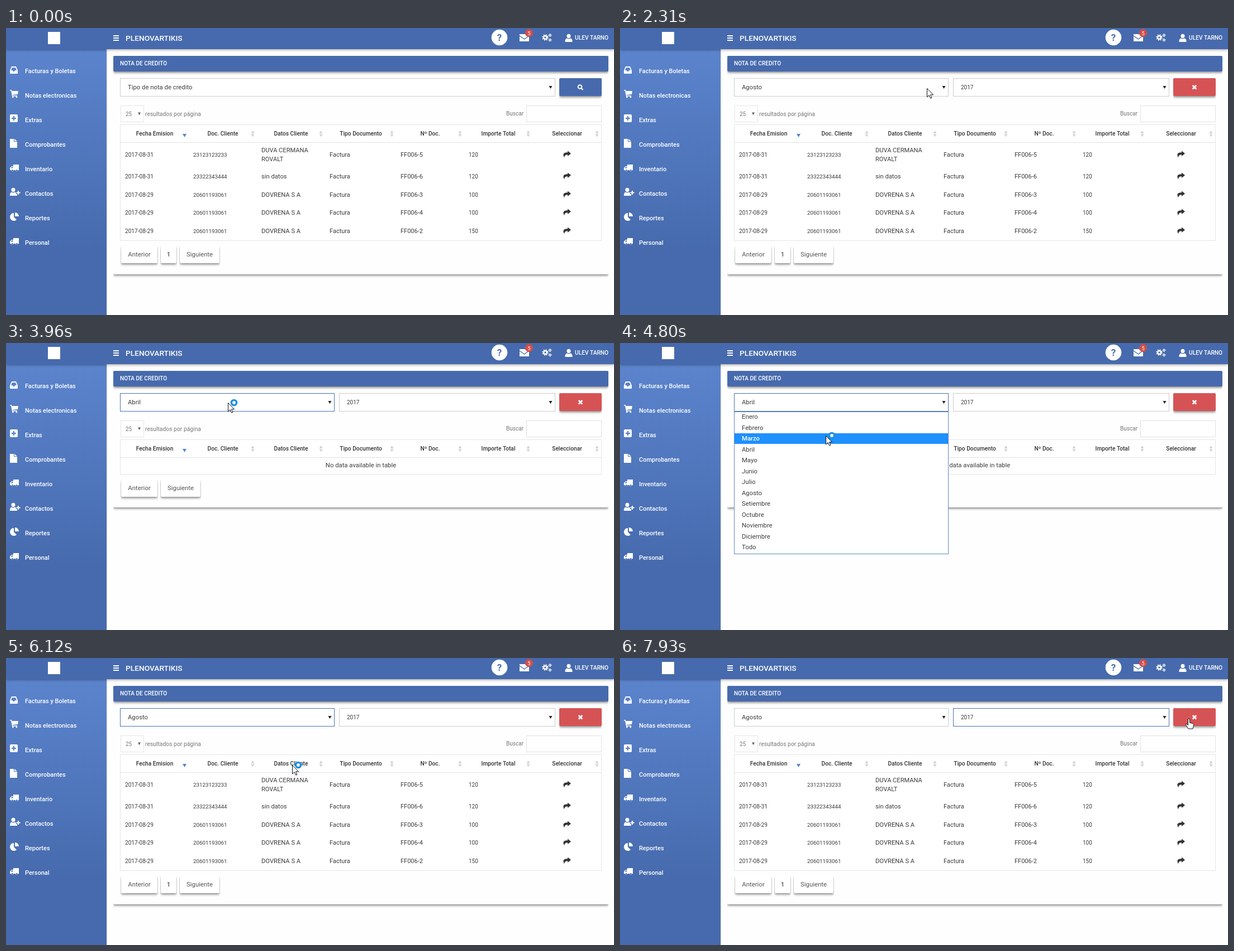
Recreate the animation shown at these times as an HTML page with a canvas. Size 1088 by 515 pixels, loop 8 s.

```html
<!DOCTYPE html>
<html lang="es">
<head>
<meta charset="utf-8">
<title>Nota de credito</title>
<style>
html, body { margin: 0; width: 100%; height: 100%; overflow: hidden; background: #fefefe; }
canvas { display: block; width: 1088px; height: 515px; }
</style>
</head>
<body>
<canvas id="stage" width="1088" height="515"></canvas>
<script>
const ctx = document.getElementById('stage').getContext('2d');
const LOOP = 8000;
const BLUE = '#466aad', RED = '#d65355', INK = '#3c3c3c', FOCUS = '#4a73b8';
const MONTHS = ['Enero', 'Febrero', 'Marzo', 'Abril', 'Mayo', 'Junio', 'Julio', 'Agosto',
  'Setiembre', 'Octubre', 'Noviembre', 'Diciembre', 'Todo'];
const YEARS = ['2016', '2017'];
const ITEM_H = 19.5, LIST_Y = 123.5;

const ICONS = {
  inbox: 'M3 0h8l3 7v5q0 1-1 1H1q-1 0-1-1V7zM4 2L2 7h3l1 2h2l1-2h3L10 2z',
  cart: 'M0 0h3l.5 2H15l-1 6-9 1 .3 1H13v1.5H4L2 1.5H0zM4 13a1.4 1.4 0 1 0 2.8 0a1.4 1.4 0 1 0-2.8 0M10.5 13a1.4 1.4 0 1 0 2.8 0a1.4 1.4 0 1 0-2.8 0',
  plus: 'M2 0h10q2 0 2 2v10q0 2-2 2H2q-2 0-2-2V2q0-2 2-2zM6 3v3H3v2h3v3h2V8h3V6H8V3z',
  file: 'M0 0h7v5h6v11H0zM8 0l5 4H8z',
  truck: 'M6 0h10v10h-1.5a2.3 2.3 0 0 1-4.6 0H6.6a2.3 2.3 0 0 1-4.6 0H0V6l3-3h3zM4 4L1.5 6.5H5V4zM2.7 10.5a1.6 1.6 0 1 0 3.2 0a1.6 1.6 0 1 0-3.2 0M10.6 10.5a1.6 1.6 0 1 0 3.2 0a1.6 1.6 0 1 0-3.2 0',
  user: 'M3 3.5a3.5 3.7 0 1 0 7 0a3.5 3.7 0 1 0-7 0M0 14q-.3-6 3.5-6.5q3 1.8 6 0q3.8.5 3.5 6.5z',
  addUser: 'M2.5 3.5a3.5 3.7 0 1 0 7 0a3.5 3.7 0 1 0-7 0M0 14q-.3-6 3.3-6.5q2.7 1.8 5.4 0q1.6.2 2.3 1.5v2h2v3zM14 5h2v2.5h2.5v2H16V12h-2V9.5h-2.5v-2H14z',
  pie: 'M7 1v7l5 5a7 7 0 1 1-5-12zM9 0a7 7 0 0 1 7 7H9z',
  share: 'M8.5 0l6 4.7-6 4.7V6.7Q3 6.5 2.5 12Q-2.5 2.8 8.5 2.8z',
  arrow: 'M0 0v15.5l3.6-3.4 2.5 5.6 2.4-1-2.5-5.4h5z',
  hand: 'M-1.5 1q1.5-2 3 0v6l6 1.5q1.5.5 1 3l-1.5 6.5h-8l-4.5-7q0-2 2-1.5l2 2z'
};
for (const name in ICONS) ICONS[name] = new Path2D(ICONS[name]);

function text(s, x, y, size, color = INK, weight = 400, align = 'left') {
  ctx.font = `${weight} ${size}px Roboto, sans-serif`;
  ctx.textAlign = align;
  ctx.fillStyle = color;
  ctx.fillText(s, x, y + 4);
}

function rect(x, y, w, h, color) {
  ctx.fillStyle = color;
  ctx.fillRect(x, y, w, h);
}

function box(x, y, w, h, border, fill = '#fff') {
  rect(x, y, w, h, fill);
  ctx.strokeStyle = border;
  ctx.lineWidth = 1;
  ctx.strokeRect(x + .5, y + .5, w - 1, h - 1);
}

// The shadow falls below only; `side` lets a little of it out left and right
function raised(x, y, w, h, fill, side = 0) {
  ctx.save();
  ctx.beginPath();
  ctx.rect(x - side, y, w + side * 2, h + 8);
  ctx.clip();
  ctx.shadowColor = 'rgba(0,0,0,.5)';
  ctx.shadowBlur = 4;
  ctx.shadowOffsetY = 2;
  ctx.fillStyle = fill;
  ctx.beginPath();
  ctx.roundRect(x, y, w, h, 2);
  ctx.fill();
  ctx.restore();
}

function disc(x, y, r, color) {
  ctx.fillStyle = color;
  ctx.beginPath();
  ctx.arc(x, y, r, 0, 7);
  ctx.fill();
}

function line(points, color, width) {
  ctx.strokeStyle = color;
  ctx.lineWidth = width;
  ctx.beginPath();
  points.forEach(p => ctx.lineTo(...p));
  ctx.stroke();
}

function tri(x, y, w, h, color) {
  ctx.fillStyle = color;
  ctx.beginPath();
  ctx.moveTo(x - w / 2, y);
  ctx.lineTo(x + w / 2, y);
  ctx.lineTo(x, y + h);
  ctx.fill();
}

function icon(name, x, y, fill = '#fff', outline) {
  ctx.save();
  ctx.translate(x, y);
  ctx.fillStyle = fill;
  ctx.fill(ICONS[name], 'evenodd');
  if (outline) {
    ctx.strokeStyle = outline;
    ctx.lineWidth = 1;
    ctx.stroke(ICONS[name]);
  }
  ctx.restore();
}

function cog(x, y, r) {
  ctx.save();
  ctx.strokeStyle = '#fff';
  ctx.lineWidth = r * .5;
  ctx.beginPath();
  ctx.arc(x, y, r * .6, 0, Math.PI * 2);
  ctx.stroke();
  ctx.setLineDash([r * Math.PI / 8]);
  ctx.lineWidth = r * .4;
  ctx.beginPath();
  ctx.arc(x, y, r, 0, Math.PI * 2);
  ctx.stroke();
  ctx.restore();
}

function sidebar() {
  const g = ctx.createLinearGradient(0, 38, 0, 400);
  g.addColorStop(0, '#5b84cd');
  g.addColorStop(1, '#466aad');
  ctx.save();
  ctx.shadowColor = 'rgba(0,0,0,.25)';
  ctx.shadowBlur = 3;
  rect(0, 38, 180, 477, g);
  ctx.restore();
  const items = [['inbox', 'Facturas y Boletas'], ['cart', 'Notas electronicas'], ['plus', 'Extras'],
    ['file', 'Comprobantes'], ['truck', 'Inventario'], ['addUser', 'Contactos'],
    ['pie', 'Reportes'], ['truck', 'Personal']];
  items.forEach(([name, label], i) => {
    const y = Math.round(77 + i * 43.95);
    const low = name === 'inbox' || name === 'truck';
    icon(name, 7, y - (low ? 8 : 10));
    text(label, 34, y, 11, '#fff', 500);
  });
}

function topBar() {
  ctx.save();
  ctx.shadowColor = 'rgba(0,0,0,.4)';
  ctx.shadowBlur = 5;
  ctx.shadowOffsetY = 1;
  rect(0, 0, 1088, 38, BLUE);
  ctx.restore();
  rect(75, 7, 22, 22, '#fff');
  for (let i = 0; i < 3; i++) rect(192, 13 + i * 4, 10, 2, '#fff');
  text('PLENOVARTIKIS', 214, 19, 13.7, '#fff', 500);
  disc(883, 17, 14.3, '#fff');
  text('?', 883, 19, 17, BLUE, 700, 'center');
  rect(919, 11, 17, 13, '#fff');
  line([[919, 14], [927.5, 20], [936, 14]], BLUE, 1.3);
  disc(936, 9, 7.2, '#cf4f4a');
  text('5', 936, 9, 9, '#fff', 400, 'center');
  cog(965, 17, 4.8);
  cog(973.5, 13, 2.5);
  cog(973.5, 21.5, 2.5);
  icon('user', 1000.5, 11);
  text('ULEV TARNO', 1018, 17, 10.2, '#fff', 500);
}

function select(x, w, label, focused) {
  box(x, 90, w, 33, focused ? FOCUS : '#ccc');
  text(label, x + 14, 106, /^\d/.test(label) ? 10 : 11.3);
  tri(x + w - 8.5, 104, 6, 5, '#222');
}

function filters(s) {
  if (s.split) {
    select(204, 384, s.month, s.focus === 'month');
    select(596, 387, '2017', s.focus === 'year');
  } else {
    select(204, 779, 'Tipo de nota de credito');
  }
  raised(990, 90, 76, 32, s.split ? RED : BLUE);
  if (s.split) {
    line([[1024.8, 103], [1031.2, 109.4]], '#fff', 2.8);
    line([[1031.2, 103], [1024.8, 109.4]], '#fff', 2.8);
  } else {
    ctx.strokeStyle = '#fff';
    ctx.lineWidth = 2;
    ctx.beginPath();
    ctx.arc(1027, 105.5, 3.3, 0, 7);
    ctx.stroke();
    line([[1029.3, 108], [1032.5, 111]], '#fff', 2.3);
  }
}

function pager(y, labels) {
  let x = 206;
  for (const [label, w] of labels) {
    raised(x, y, w, 30, '#fff', 1);
    text(label, x + w / 2, y + 14, 11.4, '#555', label === '1' ? 500 : 400, 'center');
    x += w + 6;
  }
}

function table(empty) {
  box(205, 139, 42, 30, '#e6e6e6');
  text('25', 214, 154, 10, '#777');
  tri(238.5, 151.5, 5, 5, '#666');
  text('resultados por página', 249, 154, 10.35, '#777');
  text('Buscar', 895, 153, 10.1, '#777');
  box(931, 139, 135, 30, '#e2e2e2');

  box(204, 173, 862, empty ? 63 : 209, '#e6e6e6');
  rect(204, 205, 862, 1, '#e0e0e0');
  const heads = [['Fecha Emision', 266, 319], ['Doc. Cliente', 388, 441], ['Datos Cliente', 510, 563],
    ['Tipo Documento', 635, 690], ['Nº Doc.', 759, 812], ['Importe Total', 881, 934], ['Seleccionar', 1004, 1057]];
  heads.forEach(([label, x, sx], i) => {
    text(label, x, 189, 10.2, '#333', 500, 'center');
    if (!i) return tri(sx + .5, 190, 7, 6, '#5384d4');
    tri(sx + .5, 189, 6, -5, '#d2d2d2');
    tri(sx + .5, 190.5, 6, 5, '#d2d2d2');
  });
  if (empty) {
    text('No data available in table', 635, 219, 11.3, INK, 400, 'center');
    return pager(246, [['Anterior', 65], ['Siguiente', 71]]);
  }
  const rows = [
    [227, '2017-08-31', '23123123233', '', 'FF006-5', '120'],
    [266, '2017-08-31', '23322343444', 'sin datos', 'FF006-6', '120'],
    [299, '2017-08-29', '20601193061', 'DOVRENA S A', 'FF006-3', '100'],
    [331, '2017-08-29', '20601193061', 'DOVRENA S A', 'FF006-4', '100'],
    [364, '2017-08-29', '20601193061', 'DOVRENA S A', 'FF006-2', '150']
  ];
  for (const [y, date, doc, client, num, total] of rows) {
    text(date, 213, y, 10.1);
    text(doc, 335, y, 9.8);
    text(client, 457, y, 11.2);
    text('Factura', 579, y, 11);
    text(num, 706, y, 11);
    text(total, 828, y, 10);
    icon('share', 996.5, y - 6.5, '#333');
  }
  text('DUVA CERMANA', 457, 219, 11.1);
  text('ROVALT', 457, 235, 11.1);
  pager(392, [['Anterior', 65], ['1', 28], ['Siguiente', 71]]);
}

function list(x, w, items, active) {
  const h = Math.round(items.length * ITEM_H) + 2;
  box(x, 123, w, h, '#5f88cc');
  items.forEach((label, i) => {
    const on = i === active;
    if (on) rect(x + 1, Math.round(LIST_Y + i * ITEM_H - .5), w - 2, 19, '#1e90ff');
    text(label, x + 14, Math.round(132 + i * 19.52), items === YEARS ? 10 : 11.3, on ? '#fff' : INK, on ? 500 : 400);
  });
}

// Pointer stops: time, x, y
const STOPS = [
  [230, 1004, 508], [680, 557, 107], [1010, 557, 107], [1310, 1000, 115],
  [1460, 1000, 115], [1610, 1011, 106], [1900, 1011, 106], [2470, 441, 108],
  [2620, 441, 108], [2930, 441, 147], [3090, 441, 190], [3320, 441, 190],
  [3960, 397, 107], [4490, 397, 107], [5260, 317, 271], [5750, 317, 271],
  [6510, 722, 108], [7470, 722, 108], [7930, 1018, 109], [LOOP, 1018, 109]
];

function pointerAt(t) {
  const i = STOPS.findIndex(s => s[0] > t);
  if (i < 1) return null;
  const [t0, x0, y0] = STOPS[i - 1], [t1, x1, y1] = STOPS[i];
  const u = (t - t0) / (t1 - t0), k = u * u * (3 - 2 * u);
  return { x: Math.round(x0 + (x1 - x0) * k), y: Math.round(y0 + (y1 - y0) * k) };
}

const within = (t, a, b) => t >= a && t < b;

function pointer(p, t) {
  if (p.x >= 990 && p.x < 1066 && p.y >= 90 && p.y < 123) return icon('hand', p.x, p.y, '#fff', '#111');
  icon('arrow', p.x + .5, p.y + .5, '#fff', '#111');
  if (within(t, 3400, 5410) || within(t, 5650, 7530)) {
    disc(p.x + 11, p.y, 6.3, '#1c8fe0');
    disc(p.x + 11, p.y, 2.9, '#eaf6ff');
  }
}

function draw(t) {
  const p = pointerAt(t);
  const s = {
    split: t >= 1850,
    month: within(t, 3320, 5650) ? 'Abril' : 'Agosto',
    focus: t >= 6750 ? 'year' : t >= 2620 ? 'month' : '',
    empty: within(t, 3480, 5820)
  };
  rect(0, 0, 1088, 515, '#fefefe');
  sidebar();
  topBar();
  raised(192, 51, 886, s.empty ? 244 : 391, '#fefefe');
  raised(192, 50, 886, 28, BLUE);
  text('NOTA DE CREDITO', 204, 63, 10.1, '#fff', 500);
  filters(s);
  table(s.empty);

  if (within(t, 2620, 3320) || within(t, 4490, 5650)) {
    const hover = Math.floor((p.y - LIST_Y) / ITEM_H);
    list(204, 384, MONTHS, hover >= 0 ? hover : MONTHS.indexOf(s.month));
  }
  if (within(t, 6750, 7230)) list(596, 387, YEARS, 1);
  if (p) pointer(p, t);
}

const start = performance.now();
function tick() {
  draw((performance.now() - start) % LOOP);
  requestAnimationFrame(tick);
}
tick();
</script>
</body>
</html>
```
